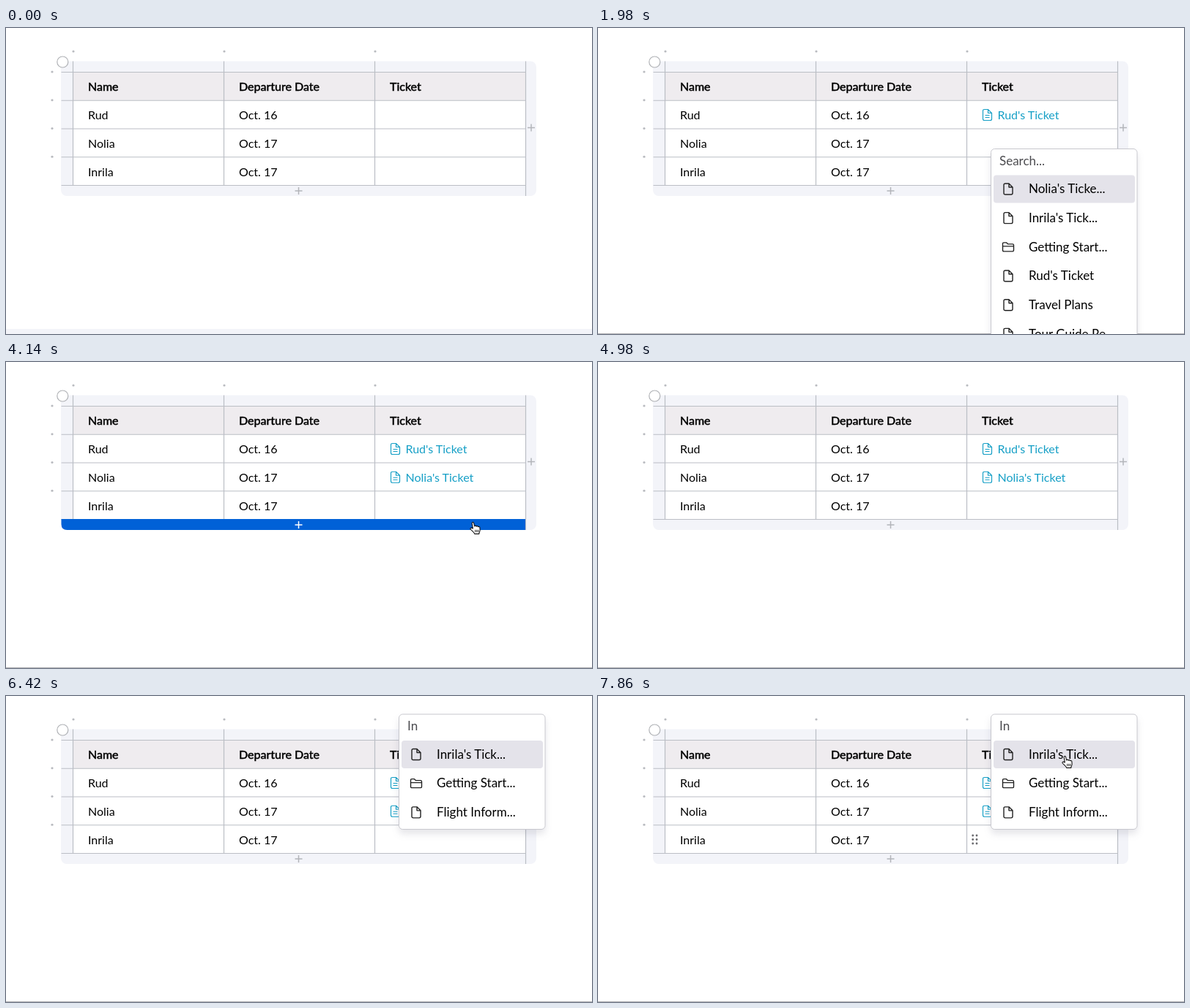
An HTML page that plays this animation: 800 px wide and 419 px high, repeating every 8 s.

```html
<!DOCTYPE html>
<html lang="en">
<head>
<meta charset="utf-8">
<title>Ticket table</title>
<style>
  html, body { margin: 0; width: 100%; height: 100%; overflow: hidden; background: #fff; }
  svg { display: block; }
  text { font: 16px Lato, sans-serif; fill: #000; }
  .head text { stroke: #000; stroke-width: .5px; }
  .grid { stroke: #bbbec5; stroke-width: 1.2; fill: none; }
  .dots { fill: #b9bbc0; }
  .plus { stroke: #b3b5ba; stroke-width: 1.5; fill: none; }
  .link { stroke: #159fc6; fill: none; stroke-width: 1.2; }
  .link text { fill: #159fc6; stroke: none; }
  #panel { fill: #fff; stroke: #c8c8ce; filter: drop-shadow(0 6px 5px rgba(60, 60, 90, .13)); }
  #menu text { font-size: 17px; }
  #menu #query { fill: #4c4c50; }
  .item rect { fill: none; }
  .item.on rect { fill: #e4e3ea; }
  .icon { fill: none; stroke: #222; stroke-width: 1.4; stroke-linejoin: round; }
  .off { display: none; }
</style>
</head>
<body>
<svg id="stage" width="800" height="419" viewBox="0 0 800 419"></svg>
<script>
const LOOP = 8000, STEP = 60, ROW = 38.75, ITEM = 39.67;
const people = ['Rud', 'Nolia', 'Inrila'];
const labels = ['Nolia\'s Ticke...', 'Inrila\'s Tick...', 'Getting Start...', 'Rud\'s Ticket',
  'Travel Plans', 'Tour Guide Re...', 'Flight Inform...', 'Doc Mentions'];
const dates = ['Oct. 16', 'Oct. 17', 'Oct. 17'];

// [time, table row, search text]; row -1 closes the menu
const menuCues = [
  [0, -1, ''], [180, 0, ''], [360, 0, 'R'], [420, 0, 'Ru'], [480, 0, 'Rud'], [1080, -1, ''],
  [1920, 1, ''], [2880, 1, 'N'], [2940, 1, 'No'], [3000, 1, 'Nol'], [3840, -1, ''],
  [5400, 2, ''], [6180, 2, 'I'], [6240, 2, 'In']
];
// [start, end, row]
const focus = [[60, 1080, 0], [1500, 3840, 1], [4620, LOOP, 2]];
const linkTimes = [1080, 3840];
// each track: hide time and [time, x, y] points
const tracks = [
  { end: 1860, at: [[780, 690, 190], [900, 664, 168], [1080, 652, 172], [1260, 620, 158], [1440, 596, 148]] },
  { end: 4980, at: [[3660, 650, 224], [3780, 637, 212], [3900, 635, 212], [4140, 633, 218], [4260, 624, 216],
    [4440, 600, 195], [4740, 545, 190]] },
  { end: LOOP, at: [[6960, 598, 184], [7080, 612, 164], [7260, 624, 143], [7380, 627, 128], [7560, 633, 81]] }
];

const text = (x, y, s) => `<text x="${x}" y="${y}">${s}</text>`;
const dot = (x, y, r = 1.6) => `<circle cx="${x}" cy="${y}" r="${r}"/>`;
const plus = (x, y, id) => `<path id="${id}" class="plus" d="M${x - 5} ${y}h10M${x} ${y - 5}v10"/>`;
const page = 'M2.5 .5H7.5L12.5 5.5V13.5Q12.5 15.5 10.5 15.5H2.5Q.5 15.5 .5 13.5V2.5Q.5 .5 2.5 .5zM7.5 .5V5.5H12.5';
const folder = 'M.5 12V3Q.5 1.5 2 1.5H5.5L7.5 3.5H14Q15.5 3.5 15.5 5V12Q15.5 13.5 14 13.5H2Q.5 13.5 .5 12zM.5 6.5H15.5';
const cols = [91.5, 297.5, 503.5, 709.5];
const lineY = [0, 1, 2, 3, 4].map(i => 60.5 + i * ROW);

const table = `
  <rect id="foot" y="412" width="800" height="7" fill="#f3f4f9"/>
  <path id="rule" d="M0 418.5H800" stroke="#b4b4b7"/>
  <rect x="75" y="45.5" width="649" height="184.5" rx="8" fill="#f3f4f9"/>
  <rect x="91.5" y="60.5" width="618" height="${ROW}" fill="#efecef"/>
  <rect x="91.5" y="${lineY[1]}" width="618" height="${3 * ROW}" fill="#fff"/>
  <path class="grid" d="${lineY.map(y => `M75.5 ${y}H709.5`).join('') +
    cols.map((x, i) => `M${x} 45.5V${i < 3 ? 215.5 : 230}`).join('')}"/>
  <g class="dots">${cols.slice(0, 3).map(x => dot(x + .5, 32)).join('') +
    lineY.slice(0, 4).map(y => dot(63, y - .5)).join('')}</g>
  <circle cx="77.3" cy="46.5" r="7.5" fill="#fff" stroke="#b0b2b6" stroke-width="1.2"/>
  <path id="bar" fill="#0061d7" d="M75.5 215H709V230H83.5Q75.5 230 75.5 222z"/>
  ${plus(717, 136.5, 'addCol')}${plus(399.5, 223, 'addRow')}
  <g class="head">${['Name', 'Departure Date', 'Ticket'].map((s, i) => text(112 + i * 206, 86.3, s)).join('')}</g>
  ${people.map((p, i) => text(112, 125 + i * ROW, p) + text(318, 125 + i * ROW, dates[i])).join('')}
  ${people.slice(0, 2).map((p, i) => `<g id="link${i}" class="link" transform="translate(525 ${111 + i * ROW})">
    <path d="${page}M3.5 8.5H9.5M3.5 11.5H9.5"/>${text(20.5, 14, p + '\'s Ticket')}</g>`).join('')}
  <g id="grip" fill="#68686c">${[191, 196.5, 202].map(y => dot(511.7, y, 1.4) + dot(517, y, 1.4)).join('')}</g>
  <path id="caret" d="M524 109v19" stroke="#111" stroke-width="1.5"/>`;

const menu = `
  <clipPath id="clip"><rect id="clipBox" x="537" y="1" width="199"/></clipPath>
  <g id="menu"><rect id="panel" x="536.5" y=".5" width="199.5" rx="5"/>
    <g clip-path="url(#clip)"><text id="query" x="548" y="22.5"></text>
    ${labels.map((s, i) => `<g class="item"><rect x="540" y="-19" width="193" height="38" rx="4"/>
      <path class="icon" transform="translate(${i === 2 ? '552 -7.5' : '553.5 -8'})" d="${i === 2 ? folder : page}"/>
      ${text(588, 5.7, s)}</g>`).join('')}</g></g>`;

const pointer = `
  <g id="hand" stroke="#111" stroke-width="1.1" stroke-linejoin="round">
    <path fill="#fff" d="M4.4 10 3.2 3.2C2.9 1.2 5.1 .7 5.6 2.6L6.6 7C6.9 5.7 8.9 5.8 9.1 7.2
      9.7 6.1 11.4 6.5 11.5 7.8 12.3 7.1 13.9 7.6 13.9 9L14.1 12C14.1 14 13.1 14.6 12.8 17.4H6.7
      C6.1 15 3.1 13.4 1.2 11 .3 9.5 2.2 8.3 4.4 10z"/>
    <path d="M7.7 11.8v3.2M9.7 11.8v3.2M11.7 11.8v3.2" stroke-width=".9"/></g>
  <path id="beam" fill="none" stroke="#222" stroke-width="1.1" d="M1 1Q4 1 4 3V14Q4 16 1 16M7 1Q4 1 4 3M4 14Q4 16 7 16"/>`;

document.getElementById('stage').innerHTML = table + menu + pointer;

const $ = id => document.getElementById(id);
const items = [...document.querySelectorAll('.item')];
const show = (id, on) => $(id).classList.toggle('off', !on);
const move = (el, x, y) => el.setAttribute('transform', `translate(${x} ${y})`);

function pointerAt(t) {
  const track = tracks.find(k => t >= k.at[0][0] && t < k.end);
  if (!track) return null;
  const next = track.at.findIndex(p => p[0] > t);
  if (next < 0) return track.at[track.at.length - 1].slice(1);
  const [a, b] = [track.at[next - 1], track.at[next]];
  const k = (t - a[0]) / (b[0] - a[0]);
  return [a[1] + (b[1] - a[1]) * k, a[2] + (b[2] - a[2]) * k];
}

// Lays out the menu and tells whether the pointer is over it
function drawMenu(t, tip) {
  const [, row, query] = menuCues.filter(c => c[0] <= t).pop();
  show('menu', row >= 0);
  if (row < 0) return false;
  const hits = items.filter((_, i) => labels[i].toLowerCase().includes(query.toLowerCase()));
  const height = Math.min(336, 39.5 + hits.length * ITEM);
  const top = row === 2 ? 183 - height : 126 + row * 39;
  move($('menu'), 0, top);
  $('panel').setAttribute('height', height - 1);
  $('clipBox').setAttribute('height', height - 2);
  $('query').textContent = query || 'Search...';
  items.forEach(el => el.classList.toggle('off', !hits.includes(el)));
  hits.forEach((el, i) => {
    const y = 55.5 + i * ITEM;
    move(el, 0, y);
    el.classList.toggle('on', i === 0 || !!tip && Math.abs(tip[1] - top - y) < 19);
  });
  return !!tip && tip[1] > top && tip[1] < top + height;
}

function draw(t) {
  const pos = pointerAt(t);
  const tip = pos && [pos[0] + 4, pos[1] + 2];
  const overMenu = drawMenu(t, tip);
  const overBar = !!tip && !overMenu && tip[1] > 215.5 && tip[1] < 230;

  show('hand', pos && (overMenu || overBar));
  show('beam', pos && !overMenu && !overBar);
  if (pos) {
    move($('hand'), ...pos);
    move($('beam'), ...pos);
  }
  show('bar', overBar);
  $('addRow').style.stroke = overBar ? '#fff' : '';

  const cell = focus.find(f => t >= f[0] && t < f[1]);
  show('caret', cell && Math.floor((t - cell[0]) / 360) % 2 === 0);
  if (cell) move($('caret'), 0, cell[2] * ROW);

  linkTimes.forEach((at, i) => show('link' + i, t >= at));
  show('grip', t >= 4500 && t < 4980 || t >= 6960);
  show('foot', t < 60);
  show('rule', t >= 60);
}

const start = performance.now();
function tick() {
  const t = (performance.now() - start) % LOOP;
  draw(Math.floor(t / STEP) * STEP);
  requestAnimationFrame(tick);
}
tick();
</script>
</body>
</html>
```
